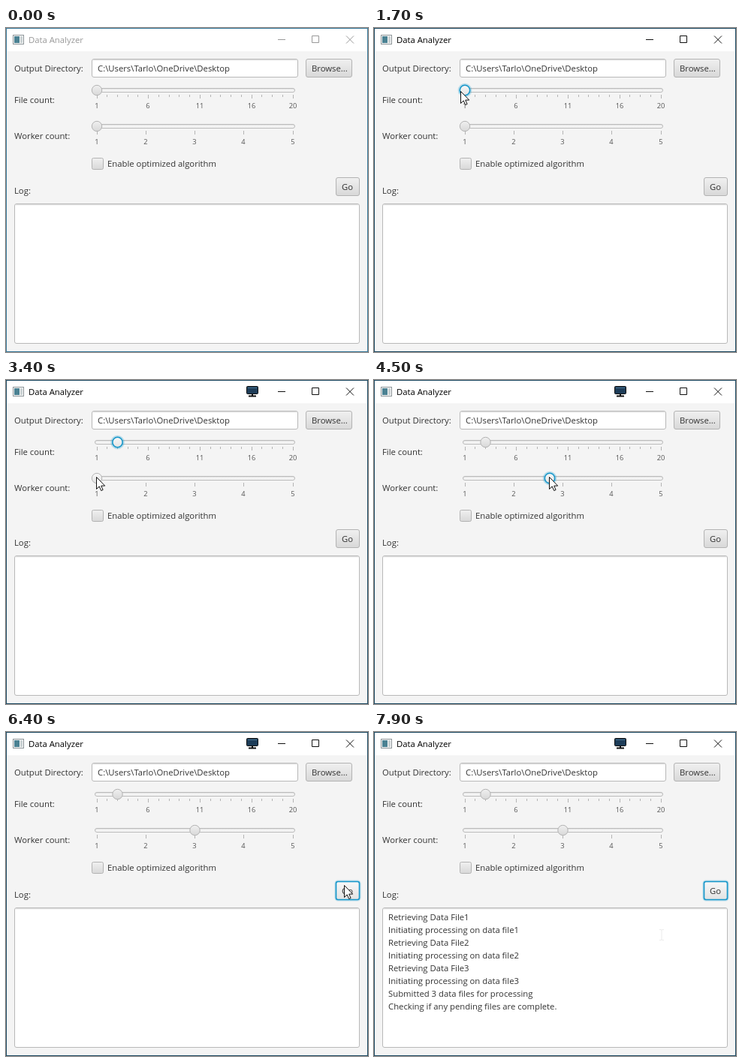
An HTML page that plays this animation: 482x432 px, repeating every 8000 ms.

```html
<!DOCTYPE html>
<html lang="en">
<head>
<meta charset="utf-8">
<title>Data Analyzer</title>
<style>
html, body { margin: 0; width: 482px; height: 432px; overflow: hidden; background: #f4f4f4; }
svg { display: block; }
text { font: 11.3px "Open Sans", "Noto Sans", sans-serif; fill: #333; white-space: pre; }
.tick { font-size: 9.3px; fill: #555; text-anchor: middle; }
.box { fill: #fff; stroke: #b8b8b8; }
.btn { fill: url(#face); stroke: #b3b3b3; }
.glow { fill: none; stroke: #0093cc; stroke-opacity: .25; stroke-width: 3; }
.focus .btn { stroke: #1696c9; stroke-width: 1.6; }
.hover .btn, .focus .btn { fill: url(#light); }
g:not(.focus) > .glow { display: none; }
</style>
</head>
<body>
<svg id="stage" width="482" height="432" viewBox="0 0 482 432">
  <defs>
    <linearGradient id="face" x2="0" y2="1"><stop stop-color="#f0f0f0"/><stop offset="1" stop-color="#d8d8d8"/></linearGradient>
    <linearGradient id="light" x2="0" y2="1"><stop stop-color="#f8f8f8"/><stop offset="1" stop-color="#e3e3e3"/></linearGradient>
    <linearGradient id="groove" x2="0" y2="1"><stop stop-color="#e4e4e4"/><stop offset="1" stop-color="#fff"/></linearGradient>
  </defs>
</svg>
<script>
const stage = document.getElementById('stage');

function add(tag, attrs, parent = stage) {
  const el = document.createElementNS('http://www.w3.org/2000/svg', tag);
  for (const k in attrs) el.setAttribute(k, attrs[k]);
  return parent.appendChild(el);
}
function label(x, y, str, cls = '', parent = stage) {
  const el = add('text', { x, y, class: cls }, parent);
  el.textContent = str;
  return el;
}
const rect = (x, y, width, height, attrs, parent) => add('rect', { x, y, width, height, ...attrs }, parent);
const path = (d, attrs, parent) => add('path', { d, fill: 'none', ...attrs }, parent);
const show = (el, on) => el.setAttribute('visibility', on ? 'visible' : 'hidden');

function field(x, y, w, h) {
  rect(x + .5, y + .5, w - 1, h - 1, { rx: 2.5, class: 'box' });
  path(`M${x + 2} ${y + 1.5}h${w - 4}`, { stroke: '#e2e2e2' });
  path(`M${x + 1} ${y + 2.5}h${w - 2}`, { stroke: '#f4f4f4' });
}
function button(x, y, w, str) {
  const g = add('g');
  rect(x, y, w, 25, { rx: 3, class: 'glow' }, g);
  rect(x + .5, y + .5, w - 1, 24, { rx: 2.5, class: 'btn' }, g);
  label(x + 8, y + 17, str, '', g);
  return g;
}
function slider(y, max, step, minor) {
  rect(118.5, y - 2.5, 266, 5, { rx: 2.5, fill: 'url(#groove)', stroke: '#b8b8b8' });
  for (let v = 1; v <= max; v++) {
    const x = Math.floor(121 + 261 * (v - 1) / (max - 1));
    const major = v === max || (v - 1) % step === 0;
    if (major || minor) path(`M${x + .5} ${y + 6}v${major ? 5 : 3}`, { stroke: '#b4b4b4' });
    if (major) label(x, y + 24, v, 'tick');
  }
  const g = add('g');
  add('circle', { r: 7.8, cy: y, class: 'glow' }, g);
  add('circle', { r: 6.7, cy: y, class: 'btn' }, g);
  return g;
}

// Window frame and title bar
rect(0, 0, 482, 31, { fill: '#fff' });
const border = rect(.5, .5, 481, 431, { fill: 'none' });
rect(9.5, 9.5, 14, 12, { fill: '#f8f8f8', stroke: '#8d9599' });
rect(11, 11, 7, 9, { fill: '#4b8293' });
rect(19, 11, 3, 9, { fill: '#c9d1d3' });
const title = label(30, 20, 'Data Analyzer');
const controls = path('M362 15.5h10M407.5 10.5h9v9h-9zM453 10.5l10 10M463 10.5l-10 10');

const monitor = add('g');
rect(320.5, 8.5, 15, 10, { rx: 1, fill: '#1d3c58', stroke: '#111' }, monitor);
path('M322 10.5h12', { stroke: '#47718f' }, monitor);
path('M328 19v2M323 21.5h10', { stroke: '#111', 'stroke-width': 2 }, monitor);

// Form
label(11, 58, 'Output Directory:');
field(114, 41, 275, 25);
label(122, 58, 'C:\\Users\\Tarlo\\OneDrive\\Desktop');
button(399, 41, 62, 'Browse...');
label(11, 100, 'File count:');
const files = slider(83, 20, 5, true);
label(11, 148, 'Worker count:');
const workers = slider(131, 5, 1, false);
rect(114.5, 173.5, 15, 15, { rx: 2, class: 'btn' });
label(135, 185, 'Enable optimized algorithm');
label(11, 221, 'Log:');
const go = button(439, 199, 32, 'Go');
field(11, 234, 460, 187);

const messages = [1, 2, 3].flatMap(n => [`Retrieving Data File${n}`, `Initiating processing on data file${n}`]);
messages.push('Submitted 3 data files for processing', 'Checking if any pending files are complete.');
const lines = messages.map((m, i) => label(19, 251 + 17 * i, m));

const arrow = path('M.5 .5v16l3.7-3.6 2.5 5.6 2.4-1-2.4-5.4h5z', { fill: '#fff', stroke: '#111' });
const beam = path('M-3 -6.5h2.5l.5 1 .5-1h2.5M0 -6v13M-3 7.5h2.5l.5-1 .5 1h2.5', { stroke: '#ececec' });

// Pointer route: time, x, y
const route = [
  [0, 450, 440], [300, 380, 330], [600, 220, 170], [900, 115, 92], [1100, 106, 83],
  [1400, 115, 84], [1800, 115, 84], [2300, 148, 85], [2500, 148, 85], [2700, 149, 127],
  [3100, 120, 129], [3800, 120, 129], [4500, 233, 129], [4900, 251, 129], [5800, 251, 129],
  [6300, 450, 204], [6500, 450, 204], [6800, 416, 241], [7300, 400, 256], [7900, 383, 270], [8000, 383, 270]
];
function pointer(t) {
  const i = route.findIndex(p => p[0] > t);
  const [a, b] = [route[i - 1], route[i]];
  const k = (t - a[0]) / (b[0] - a[0]);
  return [1, 2].map(n => Math.round(a[n] + (b[n] - a[n]) * k));
}

function place(thumb, cx, cy, focus, x, y) {
  thumb.setAttribute('transform', `translate(${cx} 0)`);
  thumb.classList.toggle('focus', focus);
  thumb.classList.toggle('hover', Math.hypot(x - cx, y - cy) < 8);
}

function draw(t) {
  const [x, y] = pointer(t);
  const active = t >= 1600;
  border.setAttribute('stroke', active ? '#1c4962' : '#38799a');
  title.style.fill = active ? '#000' : '#999';
  controls.setAttribute('stroke', active ? '#111' : '#999');
  show(monitor, t >= 2600);

  const fileX = t < 1600 ? 121 : t < 2500 ? x + 6 : 148.5;
  const workerX = t < 3800 ? 121 : t < 4900 ? x + 1 : 251.5;
  place(files, fileX, 83, active && t < 3700, x, y);
  place(workers, workerX, 131, t >= 3700 && t < 6400, x, y);
  go.classList.toggle('focus', t >= 6400);
  go.classList.toggle('hover', x >= 439 && x < 471 && y >= 199 && y < 224);
  lines.forEach((line, i) => show(line, t >= (i < 7 ? 6500 : 7500)));

  const inLog = y >= 234 && y < 421;
  show(arrow, !inLog);
  show(beam, inLog);
  for (const p of [arrow, beam]) p.setAttribute('transform', `translate(${x} ${y})`);
}

const start = performance.now();
function frame() {
  const t = (performance.now() - start) % 8000;
  draw(Math.floor(t / 100) * 100);
  requestAnimationFrame(frame);
}
frame();
</script>
</body>
</html>
```
